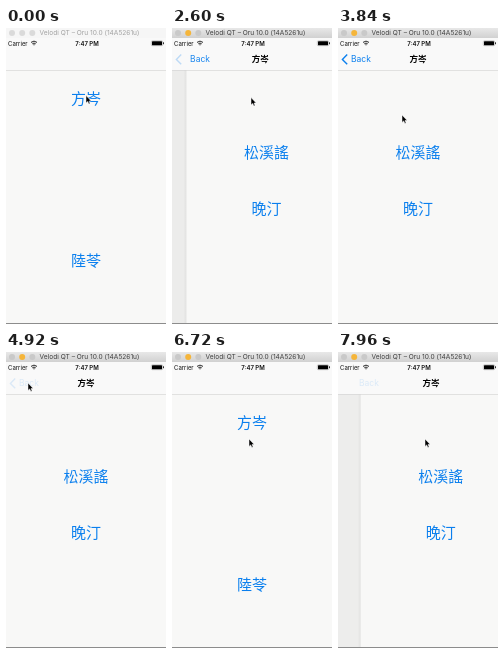
An HTML page that plays this animation: 160 by 296 pixels, repeating every 8 s.

```html
<!DOCTYPE html>
<html lang="zh-Hant">
<head>
<meta charset="utf-8">
<title>Poets</title>
<style>
html, body { margin: 0; width: 100%; height: 100%; overflow: hidden; background: #f8f8f7; }
svg { display: block; width: 160px; height: 296px; font-family: Inter, "Noto Sans CJK TC", "Noto Sans CJK", sans-serif; }
.page { font-size: 15px; fill: #0a7fee; text-anchor: middle; }
.bg { fill: #f8f8f7; }
</style>
</head>
<body>
<svg viewBox="0 0 160 296">
  <defs>
    <linearGradient id="bar" x2="0" y2="1">
      <stop stop-color="#e8e8e8"/><stop offset="1" stop-color="#d1d1d1"/>
    </linearGradient>
    <linearGradient id="shade">
      <stop stop-opacity="0"/><stop offset="1" stop-opacity=".05"/>
    </linearGradient>
  </defs>

  <rect class="bg" width="160" height="296"/>
  <g id="poets" class="page">
    <text id="poet" x="80" y="76.2">方岑</text>
    <text x="80" y="238.2">陸苓</text>
  </g>
  <rect id="dim" y="42" width="160" height="254"/>
  <g id="poems" class="page">
    <rect x="-3" y="42" width="3" height="254" fill="url(#shade)"/>
    <rect class="bg" y="42" width="160" height="254"/>
    <text x="80" y="130.2">松溪謠</text>
    <text x="80" y="186.2">晚汀</text>
  </g>

  <rect y="10" width="160" height="32" fill="#f9f9f9"/>
  <rect y="42" width="160" height=".6" fill="#d2d2d2"/>
  <text id="title" x="80" y="34.2" font-size="8.5" font-weight="600" text-anchor="middle">方岑</text>
  <path id="chevron" d="M9.2 26.5L4.4 31.4L9.2 36.3" fill="none" stroke="#0a7fee" stroke-width="1.4"/>
  <text id="back" x="13" y="34.3" font-size="8.5" fill="#0a7fee">Back</text>

  <g font-size="6" fill="#111">
    <text x="2" y="17.6">Carrier</text>
    <text x="81" y="17.6" font-weight="600" text-anchor="middle">7:47 PM</text>
  </g>
  <path d="M25 14.4Q28 11.8 31 14.4M26.3 15.8Q28 14.3 29.7 15.8" fill="none" stroke="#111" stroke-width=".9"/>
  <path d="M27.2 16.7Q28 16 28.8 16.7L28 17.6Z"/>
  <rect x="145.3" y="12.8" width="11.4" height="4.9" rx="1" fill="none" stroke="#999" stroke-width=".5"/>
  <rect x="146" y="13.3" width="10" height="3.9" rx=".5"/>
  <rect x="157.2" y="14.3" width=".8" height="1.9"/>

  <rect id="frame" width="160" height="10"/>
  <circle class="light" cx="6" cy="5" r="3"/>
  <circle id="amber" class="light" cx="16.2" cy="5" r="3"/>
  <circle class="light" cx="26.3" cy="5" r="3"/>
  <text id="caption" x="83.5" y="7.3" font-size="6.6" text-anchor="middle">Velodi QT – Oru 10.0 (14A5261u)</text>
  <rect y="295" width="160" height="1" fill="#8c8c8c"/>

  <path id="cursor" d="M0 0V7.4L1.7 5.9L2.9 8.6L4.1 8L3 5.5H5.2Z" stroke="#fff" stroke-width=".5"/>
</svg>
<script>
const LOOP = 8000, W = 160;
const $ = id => document.getElementById(id);
const clamp = v => Math.max(0, Math.min(1, v));
const set = (id, name, value) => $(id).setAttribute(name, value);
const move = (id, x, y = 0) => set(id, 'transform', `translate(${x} ${y})`);

// Pointer path: time, x, y
const path = [
  [0, 80, 67.5], [240, 80, 69], [2120, 80, 69], [2600, 79, 69.5], [2960, 79, 69.5],
  [3720, 71, 100], [3840, 64, 87], [4600, 28, 38], [4920, 22, 31], [5400, 22, 31],
  [6040, 57, 58], [6720, 77, 87], [6840, 76, 79.5], [6920, 76, 78],
  [7480, 76, 78], [7960, 87, 87], [LOOP, 87, 87]
];

function pointer(t) {
  const i = path.findIndex(p => p[0] > t);
  const [a, ax, ay] = path[i - 1], [b, bx, by] = path[i];
  const k = (t - a) / (b - a);
  return [ax + (bx - ax) * k, ay + (by - ay) * k];
}

// Critically damped spring, falling from 1 to 0
function spring(ms) {
  const s = Math.max(0, ms) * 0.0081;
  return (1 + s) * Math.exp(-s);
}

// Distance of the poem page from its resting place
function pageOffset(t) {
  if (t < 5200) return W * spring(t - 2105);
  if (t < 7530) return W * (1 - spring(t - 5180));
  return W * spring(t - 7535);
}

function draw(t) {
  const x = pageOffset(t), shown = 1 - x / W;
  move('poets', -48 * shown);
  move('poems', x);
  set('poems', 'opacity', x < 159.8 ? 1 : 0);
  set('dim', 'opacity', 0.05 * shown);
  set('poet', 'opacity', (t >= 1200 && t < 3000) || t >= 7200 ? 0.16 : 1);

  const pressed = t >= 4920 ? 0.12 : 1;
  const late = t >= 7500 ? 1 : pressed;
  move('title', 0.57 * x);
  set('title', 'opacity', clamp((100 - x) / 60));
  move('back', 0.35 * x);
  set('back', 'opacity', late * clamp((24 - x) / 10));
  set('chevron', 'opacity', late * clamp((18 - x) / 14));

  const active = t >= 920;
  set('frame', 'fill', active ? 'url(#bar)' : '#f6f6f6');
  set('caption', 'fill', active ? '#404040' : '#a2a2a2');
  for (const c of document.querySelectorAll('.light')) c.setAttribute('fill', active ? '#c9c9c9' : '#dadada');
  if (active) set('amber', 'fill', '#f5b53a');

  move('cursor', ...pointer(t));
}

function tick(now) {
  draw(Math.floor((now % LOOP) / 40) * 40);
  requestAnimationFrame(tick);
}
draw(0);
requestAnimationFrame(tick);
</script>
</body>
</html>
```
